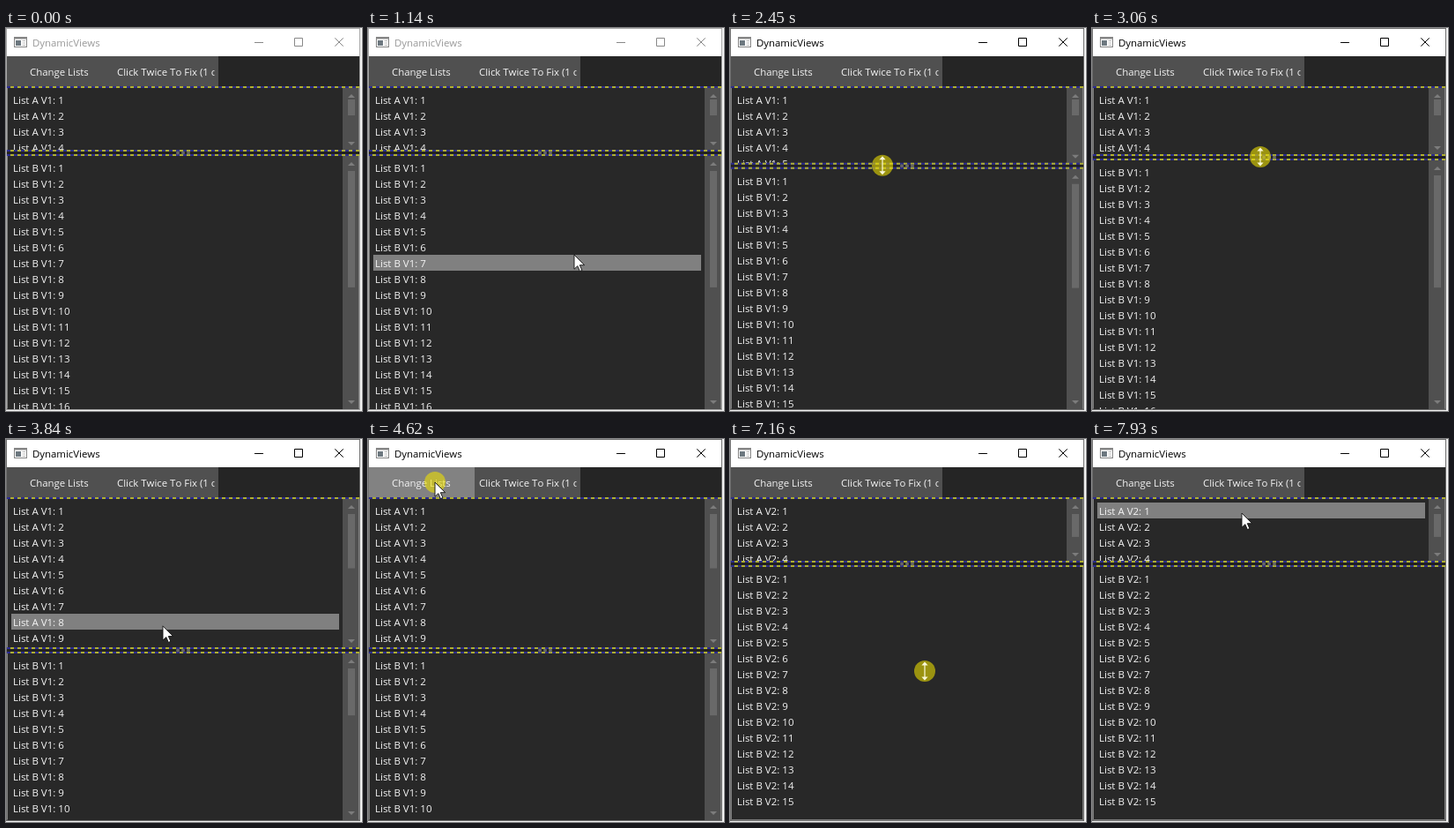
Animation of 404 by 434 pixels, one loop 8 s. Source, as an HTML page:

```html
<!DOCTYPE html>
<html lang="en">
<head>
<meta charset="utf-8">
<title>DynamicViews</title>
<style>
  html, body { margin: 0; width: 100%; height: 100%; overflow: hidden; background: #f2f2f2; }
  #stage { display: block; width: 404px; height: 434px; font: 11.4px "Open Sans", "Noto Sans", sans-serif; font-kerning: none; fill: #f4f4f4; }
  #stage svg { overflow: hidden; }
  #lists { font-size: 11.5px; }
  .dash { stroke-width: 2; fill: none; }
  .edge { stroke: #808080; fill: none; }
  .track { fill: #505050; }
  .thumb { fill: #696969; }
  .tip { fill: #7c7c7c; }
</style>
</head>
<body>
<svg id="stage" viewBox="0 0 404 434" xmlns="http://www.w3.org/2000/svg">
  <rect id="frame" width="402" height="433"/>
  <rect x="1" y="1" width="400" height="31" fill="#fff"/>
  <g id="icon">
    <rect x="9.5" y="10.5" width="14" height="11" fill="#fff" stroke="#858585"/>
    <path d="M9 11.5H24" stroke="#858585" stroke-width="2"/>
    <rect x="11" y="14" width="6" height="6" fill="#6d7880"/>
    <path d="M18.5 14.5H22M18.5 17H22M18.5 19.5H22" stroke="#bbb"/>
  </g>
  <text id="title" x="30" y="21">DynamicViews</text>
  <path id="controls" d="M282 16.5H292M327.5 11.5H336.5V20.5H327.5ZM373.3 11.3L382.7 20.7M382.7 11.3L373.3 20.7" fill="none"/>
  <rect x="1" y="32" width="400" height="400" fill="#282828"/>
  <rect x="241" y="32" width="160" height="35" fill="#252525"/>
  <rect x="1" y="32" width="240" height="35" fill="#505050"/>
  <rect id="button" x="1" y="32" width="120" height="35"/>
  <text x="27" y="54">Change Lists</text>
  <svg x="121" y="32" width="115.5" height="35"><text x="5" y="22">Click Twice To Fix (1 of 2)</text></svg>
  <g id="lists"></g>
  <g id="split"></g>
  <circle id="glow" r="12" fill="rgba(240,225,0,.58)"/>
  <path id="arrow" d="M0 0V16.2L3.8 12.7L6.4 18.6L8.9 17.5L6.3 11.7H11.6Z" fill="#fff" stroke="#111" stroke-width=".9"/>
  <path id="size" d="M0 -10.5L3.6 -6.5H.6V6.5H3.6L0 10.5L-3.6 6.5H-.6V-6.5H-3.6Z" fill="#faf8d8"/>
</svg>
<script>
const LOOP = 8000, STEP = 77, TOP = 67, BOTTOM = 432, ROW = 18, PAD = 5, GRIP = 141;
const FOCUS = 2450, SWAP = 4770;
const $ = id => document.getElementById(id);

function add(parent, tag, attrs = {}) {
  const el = document.createElementNS("http://www.w3.org/2000/svg", tag);
  set(el, attrs);
  parent.append(el);
  return el;
}
function set(el, attrs) {
  for (const key in attrs) el.setAttribute(key, attrs[key]);
}
function show(el, on) {
  el.style.display = on ? "" : "none";
}

// Each move runs from the end of the one before: mode, start, steps, x, y
const moves = [
  ["arrow", 910, 4, 234, 257],
  ["arrow", 1220, 8, 180, 150],
  ["size", 2060, 3, 170, 141],
  ["drag", FOCUS, 4, 182, 200],
  ["drag", 2910, 3, 191, 146],
  ["drag", 3380, 3, 195, 239],
  ["arrow", 3840, 7, 76, 49],
  ["press", 4620, 1, 76, 49],
  ["arrow", SWAP, 1, 76, 49],
  ["arrow", 5170, 8, 197, 134],
  ["size", 5780, 2, 200, 142],
  ["drag", 6010, 4, 222, 301],
  ["drag", 6470, 5, 212, 98],
  ["drag", 7010, 3, 221, 263],
  ["arrow", 7470, 2, 219, 260],
  ["arrow", 7700, 4, 170, 84]
];

function pointer(t) {
  let x = 320, y = 450, mode = "none";
  for (const [kind, start, steps, toX, toY] of moves) {
    if (t < start) break;
    const done = Math.floor((t - start + 8) / STEP) + 1;
    const u = Math.min(1, done / steps);
    x += (toX - x) * u;
    y += (toY - y) * u;
    mode = kind;
  }
  return { mode, x, y };
}

// The divider follows the first drag only
function dividerShift(t, p) {
  if (t < FOCUS || t >= SWAP) return 0;
  return p.mode === "drag" ? p.y - GRIP : 98;
}

function makeList(name, max) {
  const box = add($("lists"), "svg", { x: 1, width: 400 });
  const hover = add(box, "rect", { x: 5, height: ROW, fill: "#808080" });
  const rows = Array.from({ length: max }, (_, i) =>
    add(box, "text", { x: 7, y: PAD + i * ROW + 14 }));
  const bar = add(box, "g");
  const track = add(bar, "rect", { class: "track", x: 381, width: 19 });
  const thumb = add(bar, "rect", { class: "thumb", x: 387, width: 8 });
  add(bar, "path", { class: "tip", d: "M387 12L391 8L395 12Z" });
  const down = add(bar, "path", { class: "tip", d: "M387 -2L391 2L395 -2Z" });
  const edge = add(box, "path", { class: "edge" });
  let shown = "";

  return (top, bottom, version, count, p) => {
    const height = bottom - top, scrolls = count * ROW > height;
    set(box, { y: top, height });
    if (shown !== version) {
      shown = version;
      rows.forEach((row, i) => {
        row.textContent = `List ${name} ${version}: ${i + 1}`;
        show(row, i < count);
      });
    }
    const over = Math.floor((p.y - top - PAD) / ROW);
    const hot = p.mode === "arrow" && p.y < bottom && over >= 0 && over < count;
    show(hover, hot);
    if (hot) set(hover, { y: PAD + over * ROW, width: scrolls ? 372 : 390 });

    const floor = height - .5;
    set(edge, { d: `M.5 0V${floor}${scrolls ? "M" : "L"}399.5 ${floor}V0` });
    show(bar, scrolls);
    if (!scrolls) return;
    const size = (height - 36) * height / (count * ROW + 2 * PAD);
    set(track, { height });
    set(thumb, { y: size < 18 ? 14 : 18, height: Math.max(18, size) });
    set(down, { transform: `translate(0 ${height - 8})` });
  };
}

function dashLine(parent, y) {
  const d = `M1 ${y}H401`;
  add(parent, "path", { class: "dash", d, stroke: "#2c2c92" });
  add(parent, "path", { class: "dash", d, stroke: "#b0b030", "stroke-dasharray": 4, "stroke-dashoffset": 4 });
}

const drawA = makeList("A", 20), drawB = makeList("B", 30);
const split = $("split");
dashLine($("lists"), TOP);
add(split, "rect", { x: 1, y: 139, width: 400, height: 5, fill: "#222" });
dashLine(split, 139);
dashLine(split, 144);
for (let i = -1; i <= 1; i++) add(split, "circle", { cx: 201 + 6 * i, cy: 141.5, r: 2, fill: "#666" });

function draw(t) {
  const p = pointer(t), shift = dividerShift(t, p);
  const active = t >= FOCUS, second = t >= SWAP;
  const version = second ? "V2" : "V1";
  const pressed = p.mode === "press";
  const arrow = p.mode === "arrow" || pressed;

  set($("frame"), { fill: active ? "#707070" : "#a8a8a8" });
  set($("title"), { fill: active ? "#000" : "#999" });
  set($("controls"), { stroke: active ? "#000" : "#888" });
  show($("button"), arrow && p.y < TOP && p.x < 121);
  set($("button"), { fill: pressed ? "#828282" : "#6c6c6c" });

  drawA(TOP, 139 + shift, version, second ? 5 : 20, p);
  drawB(144 + shift, BOTTOM, version, second ? 15 : 30, p);
  set(split, { transform: `translate(0 ${shift})` });

  const place = { transform: `translate(${p.x} ${p.y})` };
  for (const id of ["glow", "arrow", "size"]) set($(id), place);
  show($("glow"), pressed || p.mode === "drag");
  show($("arrow"), arrow);
  show($("size"), p.mode === "size" || p.mode === "drag");
}

const begin = performance.now();
function tick() {
  draw((performance.now() - begin) % LOOP);
  requestAnimationFrame(tick);
}
tick();
</script>
</body>
</html>
```
